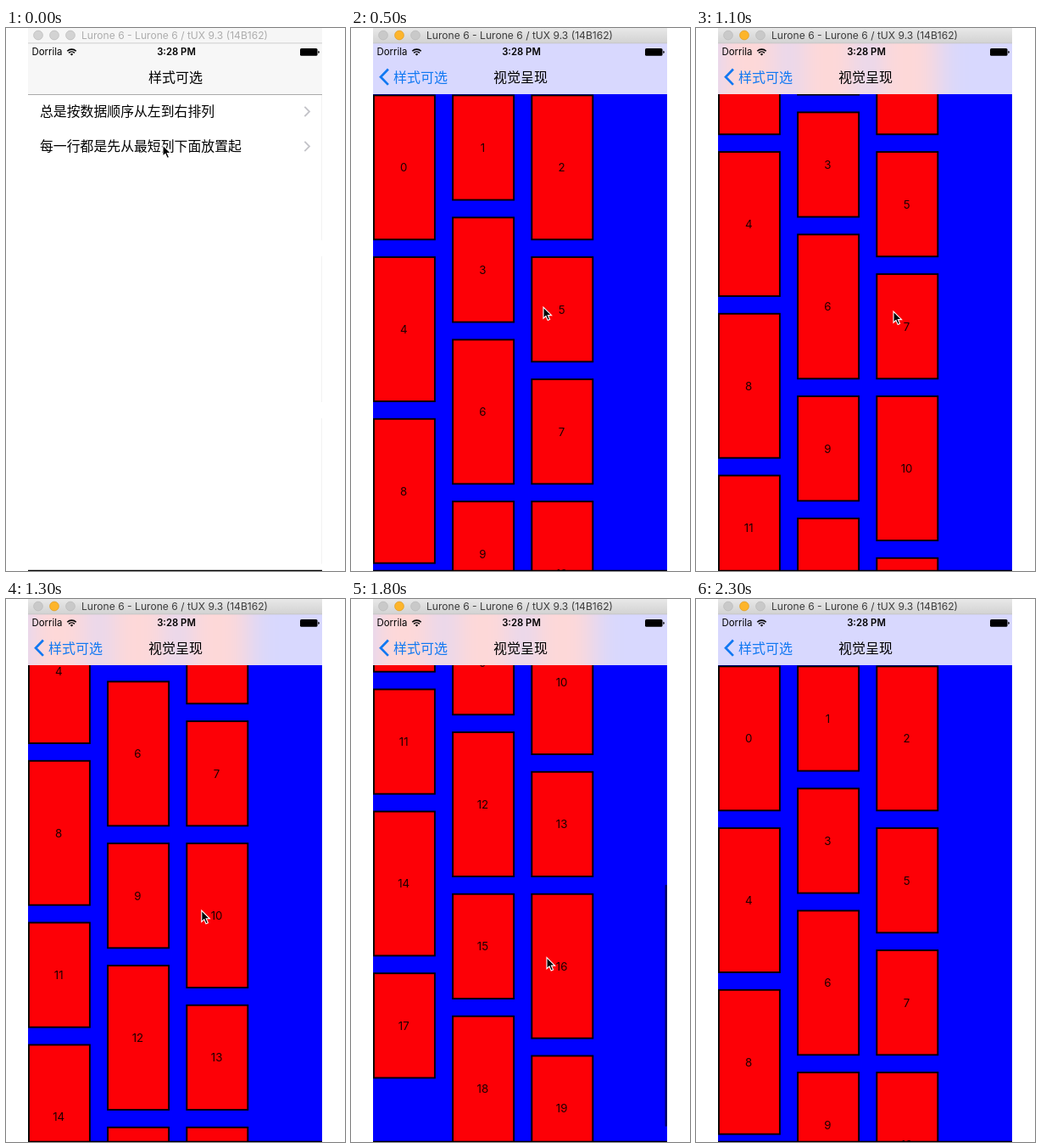
Animation, 400 px wide and 640 px high, one loop 2.4 s. Source, as an HTML page:

```html
<!DOCTYPE html>
<html lang="zh">
<head>
<meta charset="utf-8">
<style>
  html, body { margin: 0; width: 100%; height: 100%; overflow: hidden; background: #fff; }
  svg { display: block; font-family: Inter, "Noto Sans CJK SC", "Noto Sans CJK", sans-serif; }
  .cjk { font: 16px "Noto Sans CJK SC", "Noto Sans CJK", sans-serif; }
  .title { font-weight: 500; text-anchor: middle; }
  .row { font-size: 15.87px; }
  .line { fill: none; stroke-linecap: square; }
</style>
</head>
<body>
<svg width="400" height="640" viewBox="0 0 400 640">
  <defs>
    <clipPath id="phone"><rect x="26" width="347" height="640"/></clipPath>
    <clipPath id="barClip"><rect x="26" y="18" width="347" height="60"/></clipPath>
    <filter id="spread" filterUnits="userSpaceOnUse" x="-100" y="0" width="600" height="100" color-interpolation-filters="sRGB">
      <feGaussianBlur stdDeviation="16 0"/>
    </filter>
    <linearGradient id="chrome" x2="0" y2="1">
      <stop stop-color="#e8e8e8"/><stop offset="1" stop-color="#d2d2d2"/>
    </linearGradient>
  </defs>
  <g clip-path="url(#phone)">
    <g id="list">
      <rect x="26" y="78" width="347" height="562" fill="#fff"/>
      <rect id="pressed" x="26" y="119" width="347" height="41" fill="#d9d9d9"/>
      <text class="cjk row" x="40" y="104">总是按数据顺序从左到右排列</text>
      <text class="cjk row" x="40" y="145">每一行都是先从最短列下面放置起</text>
      <path class="line" d="M353 93.5l5 5-5 5M353 134.5l5 5-5 5" stroke="#c4c4c9" stroke-width="1.8"/>
    </g>
    <rect id="dim" x="26" y="78" width="347" height="562"/>
    <g id="detail">
      <rect x="26" y="78" width="347" height="562" fill="#00f"/>
      <g id="cells"></g>
      <rect id="thumb" x="370.5" width="2.5" height="285" rx="1.2" fill="#000" fill-opacity=".6"/>
    </g>

    <rect id="bar" x="26" y="18" width="347" height="60"/>
    <g clip-path="url(#barClip)"><g id="tint"><g id="bands" filter="url(#spread)"></g></g></g>
    <rect id="hairline" x="26" y="78" width="347" height="1" fill="#aaa"/>

    <text id="oldTitle" class="cjk title" y="63.8">样式可选</text>
    <g id="back" fill="#1178f2">
      <path class="line" d="M43 49.5l-8 8.2 8 8.2" stroke="#1178f2" stroke-width="2.7"/>
      <text id="backLabel" class="cjk" y="63.8">样式可选</text>
    </g>
    <text id="newTitle" class="cjk title" y="63.8">视觉呈现</text>

    <text x="30.5" y="32.2" font-size="11.4">Dorrila</text>
    <g fill="none" stroke="#000" stroke-width="1.6">
      <path d="M72.3 27.3a7.4 7.4 0 0 1 10.4 0M74.1 29.3a4.9 4.9 0 0 1 6.8 0"/>
      <path d="M77.5 32.6l-1.7-1.7a2.4 2.4 0 0 1 3.4 0z" fill="#000" stroke="none"/>
    </g>
    <text x="201" y="32.2" font-size="11.3" font-weight="600" text-anchor="middle">3:28 PM</text>
    <rect x="347" y="24" width="20.5" height="8.8" rx="1.6"/>
    <path d="M368.3 26.8q1.5 .3 1.5 1.6t-1.5 1.6z"/>

    <rect id="chromeBar" x="26" width="347" height="18"/>
    <rect x="26" y="17.5" width="347" height=".8" fill="#c3c3c3"/>
    <g id="lights" stroke-width=".7">
      <circle cx="38" cy="8.5" r="5.4"/><circle cx="57" cy="8.5" r="5.4"/><circle cx="76" cy="8.5" r="5.4"/>
    </g>
    <text id="caption" x="89" y="13" font-size="12.1">Lurone 6 - Lurone 6 / tUX 9.3 (14B162)</text>
    <rect x="26" y="638.8" width="347" height="1.2"/>
  </g>
  <path id="cursor" d="M0 0v13.2l3-2.7 2.2 5 2.4-1-2.2-4.9h4.2z" stroke="#fff" stroke-width="1.1"/>
</svg>
<script>
const LOOP = 2400, STEP = 100, WIDTH = 347, TOP = 78.5;
const CELL_W = 73.8, COLUMN = 93.2, GAP = 19;
const $ = id => document.getElementById(id);
const set = (node, attrs) => { for (const key in attrs) node.setAttribute(key, attrs[key]); return node; };
const add = (parent, tag, attrs) =>
  parent.appendChild(set(document.createElementNS("http://www.w3.org/2000/svg", tag), attrs));
const clamp = v => Math.min(1, Math.max(0, v));

// Each item goes below the shortest column; pitches are tenths of a pixel so ties stay exact.
const ends = [0, 0, 0];
const items = Array.from({ length: 20 }, (_, i) => {
  const col = ends.indexOf(Math.min(...ends));
  const pitch = i % 2 ? 1440 : 1907;
  const item = { col, x: 26 + col * COLUMN, y: TOP + ends[col] / 10, h: pitch / 10 - GAP };
  ends[col] += pitch;
  return item;
});
const contentHeight = Math.max(...ends) / 10;

items.forEach(({ x, y, h }, i) => {
  add($("cells"), "rect", {
    x: x + 0.9, y: y + 0.9, width: CELL_W - 1.8, height: h - 1.8,
    fill: "#fd0006", stroke: "#000", "stroke-width": 1.9
  });
  add($("cells"), "text", {
    x: x + CELL_W / 2 - 0.7, y: y + h / 2 + 4.9,
    "font-size": 13.3, "text-anchor": "middle", fill: "#1c0000"
  }).textContent = i;
});

const blueBand = add($("bands"), "rect", { y: 18, width: 600, height: 60, fill: "#00f" });
const redBands = ends.map((_, col) => add($("bands"), "rect", {
  x: 26 + col * COLUMN, y: 18, width: CELL_W, height: 60, fill: "#f00"
}));

// Piecewise linear track of [time, ...values].
function track(points, t) {
  const next = points.findIndex(p => p[0] > t);
  if (next < 0) return points[points.length - 1].slice(1);
  if (next === 0) return points[0].slice(1);
  const a = points[next - 1], b = points[next], k = (t - a[0]) / (b[0] - a[0]);
  return a.slice(1).map((v, i) => v + (b[i + 1] - v) * k);
}
const scrollTrack = [[600, 0], [800, 20], [1100, 124], [1300, 270], [1600, 526],
  [1750, 560], [1850, 530], [2000, 404.5], [2100, 230], [2200, 70], [2300, 0]];
const cursorTrack = [[200, 185, 138], [500, 227, 329], [1100, 233, 334], [1600, 227.5, 417], [2000, 234.5, 428]];

// Share of the push still to travel, a critically damped spring.
function remaining(t) {
  if (t < 100) return 1;
  if (t >= 400) return 0;
  const k = t * 0.0245 - 0.4;
  return (1 + k) * Math.exp(-k);
}

function draw(t) {
  const active = t >= 100, r = remaining(t);
  const [scroll] = track(scrollTrack, t);
  const [cx, cy] = track(cursorTrack, t);

  set($("list"), { transform: `translate(${-0.3 * WIDTH * (1 - r)})` });
  set($("pressed"), { opacity: +active });
  set($("dim"), { opacity: 0.1 * (1 - r) });
  set($("detail"), { transform: `translate(${WIDTH * r})` });
  set($("cells"), { transform: `translate(0 ${-scroll})` });
  set($("thumb"), {
    y: 70 + scroll / contentHeight * 562,
    opacity: t >= 1800 && t < 2300 ? 1 : 0
  });

  // The bar picks up the colour of whatever lies beneath it.
  set($("bar"), { fill: r === 1 ? "#f7f7f7" : "#fefefe" });
  set($("tint"), { opacity: r === 1 ? 0 : 0.145 + Math.min(0.12, 2 * r) });
  set($("bands"), { transform: `translate(${WIDTH * r})` });
  set(blueBand, { x: 26 - 60 * clamp(1 - 16 * r) });
  redBands.forEach((band, col) => {
    let covered = 0;
    for (const item of items) {
      if (item.col !== col) continue;
      const y = item.y - scroll;
      covered += Math.max(0, Math.min(78, y + item.h) - Math.max(18, y));
    }
    set(band, { opacity: covered / 60 });
  });
  set($("hairline"), { opacity: r === 1 ? 1 : 0 });

  set($("oldTitle"), { x: 82 + 118 * r, opacity: clamp(2 * r - 1) });
  set($("back"), { opacity: clamp(1 - 11 * r) });
  set($("backLabel"), { x: 50 + 118 * r });
  set($("newTitle"), { x: 200 + 200 * r, opacity: clamp(1.06 - r) * (r < 1) });

  set($("chromeBar"), { fill: active ? "url(#chrome)" : "#f6f6f6" });
  set($("caption"), { fill: active ? "#3c3c3c" : "#adadad" });
  [...$("lights").children].forEach((light, i) => {
    const lit = active && i === 1;
    set(light, { fill: lit ? "#fdb52b" : active ? "#c9c9c9" : "#d3d3d3", stroke: lit ? "#dd9a20" : "#b9b9b9" });
  });

  set($("cursor"), { transform: `translate(${cx} ${cy})`, opacity: t < 2300 ? 1 : 0 });
}

const start = performance.now();
function tick() {
  const t = (performance.now() - start) % LOOP;
  draw(Math.floor(t / STEP) * STEP);
  requestAnimationFrame(tick);
}
tick();
</script>
</body>
</html>
```
